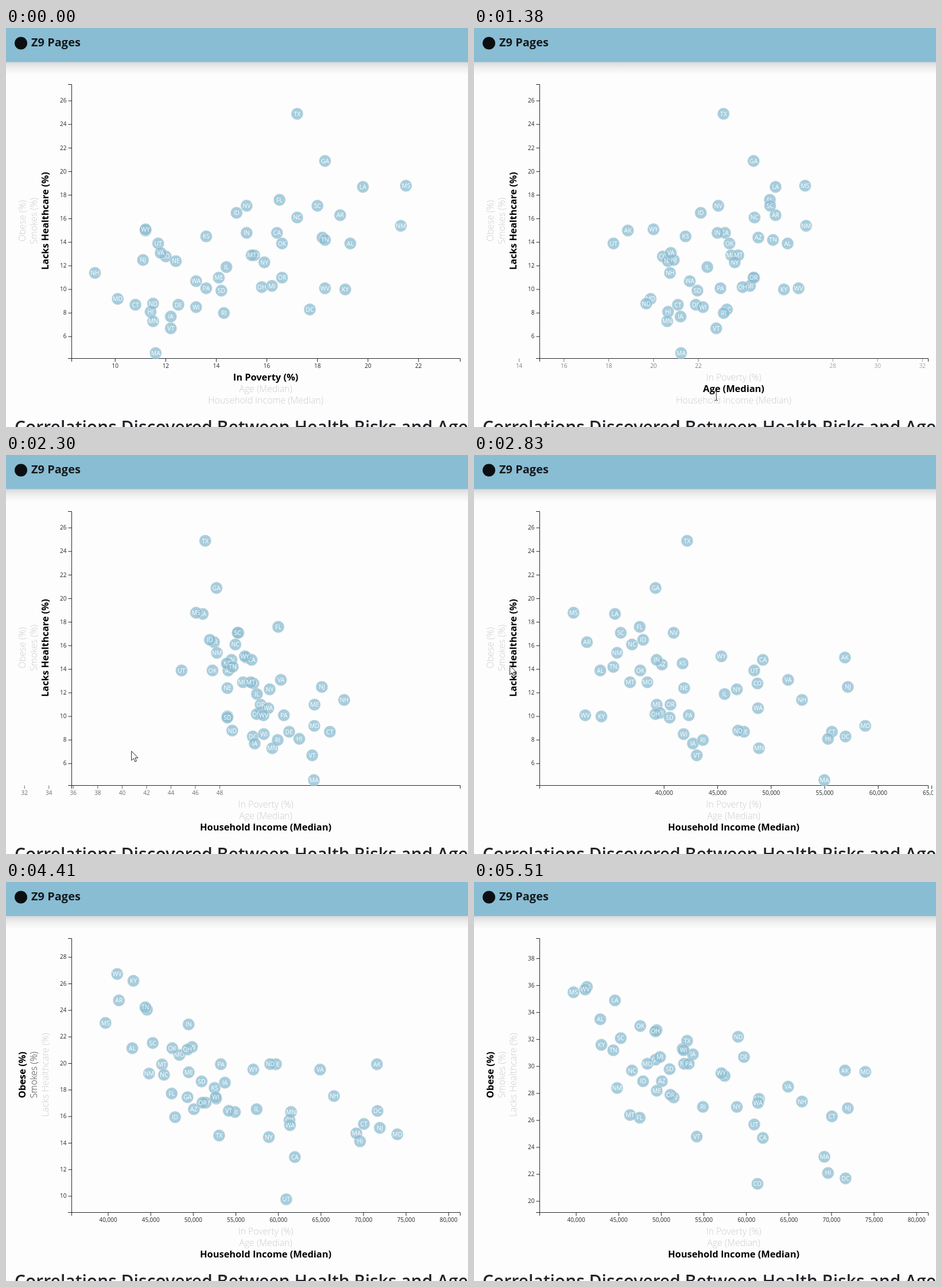
Write an HTML page that moves like this. It is 805 px wide and 696 px high and loops after 6.13 s.

```html
<!DOCTYPE html>
<html lang="en">
<head>
<meta charset="utf-8">
<title>Health risks</title>
<style>
html, body { margin: 0; width: 100%; height: 100%; overflow: hidden; background: #fdfdfd; }
svg { display: block; font-family: "Open Sans", "Noto Sans", sans-serif; }
.brand { font-size: 20px; font-weight: 700; fill: #15191c; }
.headline { font-size: 30px; font-weight: 600; fill: #212529; }
.axis { fill: none; stroke: #212529; }
.tick line { stroke: #212529; }
.tick text { font-size: 10px; fill: #212529; }
.label { font-size: 15.9px; font-weight: 300; text-anchor: middle; }
.label.active { font-size: 16.4px; font-weight: 700; }
.dot circle { fill: #89bdd3; stroke: #e3e3e3; opacity: .75; }
.dot text { font-size: 10.5px; font-weight: 500; fill: #fff; text-anchor: middle; }
.cursor { fill: #fff; stroke: #222; stroke-linejoin: round; }
</style>
</head>
<body>
<svg width="805" height="696" viewBox="0 0 805 696">
  <defs>
    <linearGradient id="shade" x2="0" y2="1">
      <stop offset="0" stop-color="#d9d9d9"/>
      <stop offset=".5" stop-color="#f0f0f0"/>
      <stop offset="1" stop-color="#fdfdfd"/>
    </linearGradient>
  </defs>
  <rect width="805" height="696" fill="#fdfdfd"/>
  <rect y="59" width="805" height="23" fill="url(#shade)"/>
  <rect width="805" height="59.5" fill="#89bdd3"/>
  <circle cx="26" cy="26.5" r="11" fill="#0c0f11"/>
  <text class="brand" x="44" y="32">Z9 Pages</text>
  <text class="headline" x="15" y="706.5">Correlations Discovered Between Health Risks and Age</text>
  <svg id="chart" x="14" y="60" width="786" height="624" viewBox="14 60 786 624">
    <g id="ticks"></g>
    <path class="axis" d="M114.5 582V576.5H791.5V582M108 98.5H114.5V576.5H108"/>
    <g id="dots"></g>
    <g id="labels"></g>
  </svg>
  <g id="pointer" class="cursor">
    <path data-shape="arrow" d="M0 0V16L3.7 12.6L6.2 18.2L8.7 17.1L6.3 11.6H11.3Z"/>
    <path data-shape="hand" d="M-1.5 1.5Q0 -.5 1.5 1.5V7Q3.5 6 4 7.5Q6 6.8 6.5 8.3Q9 7.8 9 10V14Q8.5 17 7 20H.5Q-1.5 16 -4.5 12.5Q-5.5 11 -4 10.3L-1.5 12ZM1.5 7V11M4 7.5V11M6.5 8.3V11"/>
    <path data-shape="beam" fill="none" d="M-3 -8H-1L0 -7L1 -8H3M0 -7V7M-3 8H-1L0 7L1 8H3"/>
  </g>
</svg>
<script>
const LOOP = 6130, MOVE = 1000, FADE = 300;
const LEFT = 114.5, TOP = 98.5, WIDTH = 677, HEIGHT = 478;

const states = ('AL AK AZ AR CA CO CT DE DC FL GA HI ID IL IN IA KS KY LA ME MD MA MI MN MS MO ' +
  'MT NE NV NH NJ NM NY NC ND OH OK OR PA RI SC SD TN TX UT VT VA WA WV WI WY').split(' ');

const poverty = [19.3, 11.2, 18.2, 18.9, 16.4, 12, 10.8, 12.5, 17.7, 16.5, 18.3, 11.4, 14.8,
  14.4, 15.2, 12.2, 13.6, 19.1, 19.8, 14.1, 10.1, 11.6, 16.2, 11.5, 21.5, 15.5,
  15.4, 12.4, 15.2, 9.2, 11.1, 21.3, 15.9, 17.2, 11.5, 15.8, 16.6, 16.6, 13.6,
  14.3, 18, 14.2, 18.3, 17.2, 11.7, 12.2, 11.8, 13.2, 18.3, 13.2, 11.2];
const age = [38.6, 33.3, 36.9, 37.8, 36, 36.3, 40.5, 39.6, 33.8, 41.6, 36.1, 38.1, 35.9,
  37.5, 37.3, 38.2, 36.2, 38.5, 36.1, 44.1, 38.3, 39.4, 39.6, 37.8, 36.7, 38.5,
  39.6, 36.2, 37.4, 42.5, 39.4, 37.2, 38.2, 38.3, 35.1, 39.4, 36.2, 39.3, 40.7,
  39.8, 38.8, 36.6, 38.6, 34.3, 30.5, 42.8, 37.7, 37.5, 41.9, 39.2, 36.6];
const income = [42830, 71583, 50068, 41262, 61933, 61303, 70048, 59716, 71648, 47463, 49321, 69592, 47861,
  57444, 49446, 53712, 52504, 42958, 44555, 49462, 73971, 69160, 49847, 61481, 39680, 48363,
  46328, 52686, 51450, 66532, 71919, 44803, 58878, 46556, 59029, 49308, 47529, 51075, 53234,
  54891, 45238, 50979, 44361, 53035, 60922, 54166, 64902, 61366, 41059, 52622, 57055];
const healthcare = [13.9, 15, 14.4, 16.3, 14.8, 12.8, 8.7, 8.7, 8.3, 17.6, 20.9, 8.1, 16.5,
  11.9, 14.8, 7.7, 14.5, 10, 18.7, 11, 9.2, 4.6, 10.3, 7.3, 18.8, 12.9,
  12.9, 12.4, 17.1, 11.4, 12.5, 15.4, 12.3, 16.1, 8.8, 10.2, 13.9, 11, 10.1,
  8, 17.1, 9.9, 14.2, 24.9, 13.9, 6.7, 13.1, 10.7, 10.1, 8.5, 15.1];
const smokes = [21.1, 19.9, 16.5, 24.7, 12.9, 15.7, 15.4, 19.9, 16.4, 17.7, 17.4, 14.1, 15.9,
  16.5, 22.9, 18.5, 18.1, 26.2, 24, 19.3, 14.6, 14.7, 21.2, 16.3, 23, 20.6,
  19.9, 17.3, 17, 17.5, 15.1, 19.2, 14.4, 19.1, 19.9, 21, 21.1, 17, 19.9,
  16.3, 21.5, 18.6, 24.2, 14.5, 9.7, 16.4, 19.5, 15.3, 26.7, 17.4, 19.5];
const obesity = [33.5, 29.7, 28.9, 35.9, 24.7, 21.3, 26.3, 30.7, 21.7, 26.2, 30.5, 22.1, 28.9,
  29.3, 32.7, 30.9, 31.3, 31.6, 34.9, 28.2, 29.6, 23.3, 30.7, 27.6, 35.5, 30.2,
  26.4, 30.2, 27.7, 27.4, 26.9, 28.4, 27, 29.7, 32.2, 32.6, 33, 27.9, 30.2,
  27, 32.1, 29.8, 31.2, 31.9, 25.7, 24.8, 28.5, 27.3, 35.7, 31.2, 29.5];

const clamp = v => Math.min(1, Math.max(0, v));
const lerp = (a, b, p) => a + (b - a) * p;
const ease = t => t < .5 ? 4 * t ** 3 : 1 - 4 * (1 - t) ** 3;

function add(parent, tag, attrs = {}, text = '') {
  const el = document.createElementNS('http://www.w3.org/2000/svg', tag);
  for (const k in attrs) el.setAttribute(k, attrs[k]);
  el.textContent = text;
  parent.append(el);
  return el;
}

// One selectable measure: its scale, its ticks and the moment it is clicked.
function measure(values, at, step, vertical) {
  const lo = Math.min(...values) * .9, hi = Math.max(...values) * 1.1;
  const scale = vertical
    ? v => TOP + (hi - v) / (hi - lo) * HEIGHT
    : v => LEFT + (v - lo) / (hi - lo) * WIDTH;
  const ticks = new Set();
  for (let v = Math.ceil(lo / step) * step; v <= hi; v += step) ticks.add(v);
  return { values, at, scale, ticks };
}

function makeAxis(measures, vertical) {
  const all = new Set(measures.flatMap(m => [...m.ticks]));
  const ticks = [...all].map(value => {
    const el = add(document.getElementById('ticks'), 'g', { class: 'tick' });
    add(el, 'line', vertical ? { x2: -6 } : { y2: 6 });
    add(el, 'text', vertical ? { x: -9, dy: '.32em', 'text-anchor': 'end' }
      : { y: 9, dy: '.71em', 'text-anchor': 'middle' }, value.toLocaleString('en-US'));
    return { value, el };
  });
  return { measures, ticks, vertical };
}

const xAxis = makeAxis([measure(poverty, 0, 2), measure(age, 909, 2), measure(income, 1862, 5000)], false);
const yAxis = makeAxis([measure(healthcare, 0, 2, true), measure(smokes, 3167, 2, true),
  measure(obesity, 4310, 2, true)], true);

const dots = states.map(name => {
  const el = add(document.getElementById('dots'), 'g', { class: 'dot' });
  add(el, 'circle', { r: 10.5 });
  add(el, 'text', { y: 3.8 }, name);
  return el;
});

// Labels: active span, and the times at which they turn dark or pale again.
const label = (text, place, from, to, dark, flips) => ({
  el: add(document.getElementById('labels'), 'text', { transform: place }, text), from, to, dark, flips
});
const below = y => `translate(452.5 ${y})`;
const beside = x => `translate(${x} 336.5) rotate(-90)`;
const labels = [
  label('In Poverty (%)', below(615), 0, 909, 1, [909]),
  label('Age (Median)', below(635), 909, 1862, 0, [560, 1862]),
  label('Household Income (Median)', below(655), 1862, LOOP, 0, [160, 520, 1420]),
  label('Lacks Healthcare (%)', beside(74), 0, 3167, 1, [3167]),
  label('Smokes (%)', beside(54), 3167, 4310, 0, [2900, 4310]),
  label('Obese (%)', beside(34), 4310, LOOP, 0, [3470])
];

const pointer = document.getElementById('pointer');
const path = [
  [0, 425, 646, ''], [160, 425, 646, 'hand'], [480, 424, 640, 'hand'], [560, 423, 627, 'hand'],
  [909, 423, 627, 'beam'], [1250, 423, 627, 'beam'], [1420, 422, 646, 'hand'], [1862, 422, 646, 'beam'],
  [1950, 421, 645, 'arrow'], [2300, 219, 517, 'arrow'], [2700, 90, 400, 'arrow'], [2900, 48, 350, 'hand'],
  [3167, 48, 349, 'beam'], [3380, 47, 349, 'beam'], [3470, 35, 349, 'hand'], [4000, 30, 349, 'hand'],
  [4310, 28, 348, 'beam'], [4640, 28, 348, 'beam'], [4750, 40, 365, 'arrow'], [5200, 250, 665, 'arrow'],
  [5360, 290, 700, ''], [LOOP, 290, 700, '']
];

function viewOf(axis, t) {
  const i = axis.measures.findLastIndex(m => m.at <= t);
  const to = axis.measures[i], from = axis.measures[Math.max(0, i - 1)];
  return { from, to, p: ease(clamp((t - to.at) / MOVE)) };
}

function drawTicks(axis, { from, to, p }) {
  for (const { value, el } of axis.ticks) {
    const before = from.ticks.has(value), after = to.ticks.has(value);
    const pos = lerp(from.scale(value), to.scale(value), p);
    el.setAttribute('opacity', lerp(+before, +after, p));
    el.setAttribute('transform', axis.vertical ? `translate(${LEFT} ${pos})` : `translate(${pos} 576.5)`);
  }
}

const place = ({ from, to, p }, i) => lerp(from.scale(from.values[i]), to.scale(to.values[i]), p);

function drawLabel({ el, from, to, dark, flips }, t) {
  let level = dark, dir = dark ? 1 : -1, last = 0;
  for (const f of [...flips, Infinity]) {
    level = clamp(level + dir * (Math.min(f, t) - last) / FADE);
    if (f >= t) break;
    last = f;
    dir = -dir;
  }
  const active = t >= from && t < to;
  const tone = active ? 0 : Math.round(204 * (1 - level));
  el.setAttribute('class', active ? 'label active' : 'label');
  el.setAttribute('fill', `rgb(${tone},${tone},${tone})`);
}

function drawPointer(t) {
  const i = Math.min(path.length - 2, path.findLastIndex(k => k[0] <= t));
  const [t0, x0, y0, shape] = path[i], [t1, x1, y1] = path[i + 1];
  const p = (t - t0) / (t1 - t0);
  pointer.setAttribute('transform', `translate(${lerp(x0, x1, p)} ${lerp(y0, y1, p)})`);
  for (const el of pointer.children) el.style.display = el.dataset.shape === shape ? '' : 'none';
}

function draw(t) {
  const xView = viewOf(xAxis, t), yView = viewOf(yAxis, t);
  drawTicks(xAxis, xView);
  drawTicks(yAxis, yView);
  dots.forEach((el, i) => el.setAttribute('transform', `translate(${place(xView, i)} ${place(yView, i)})`));
  labels.forEach(l => drawLabel(l, t));
  drawPointer(t);
}

const start = performance.now();
function tick() {
  draw((performance.now() - start) % LOOP);
  requestAnimationFrame(tick);
}
tick();
</script>
</body>
</html>
```
